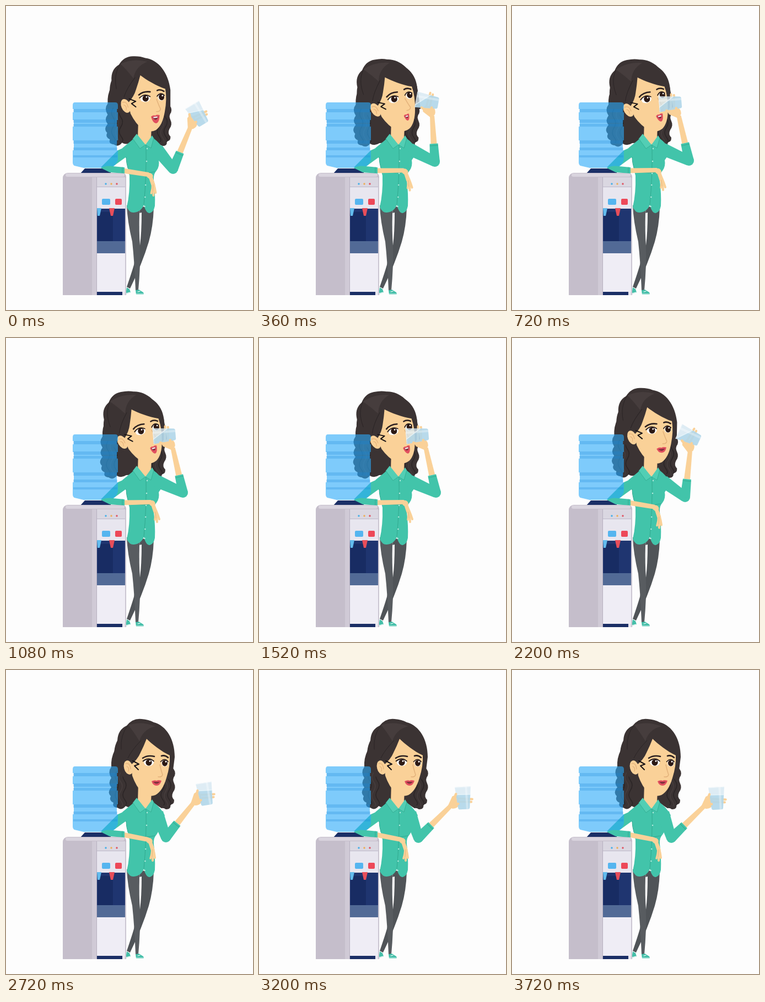
These frames come from a looping animation (448x552 px, 4080 ms). An HTML page with a canvas:

```html
<!DOCTYPE html>
<html lang="en">
<head>
<meta charset="utf-8">
<title>Water cooler break</title>
<style>
html, body { margin: 0; width: 100%; height: 100%; overflow: hidden; background: #fdfdfd; }
canvas { display: block; }
</style>
</head>
<body>
<canvas id="stage" width="448" height="552"></canvas>
<script>
const ctx = document.getElementById('stage').getContext('2d');
const LOOP = 4080, STEP = 40, RAD = Math.PI / 180;
const SKIN = '#fad198', SKIN_DARK = '#e3b27b', HAIR = '#3b3333', HAIR_DARK = '#2b2526',
  HAIR_LIGHT = '#463d3d', TEAL = '#42c4aa', TEAL_DARK = '#32a98f', NAVY = '#1b2f66';

// time, elbow x/y, glass x/y, glass tilt, head tilt, mouth width/height
const KEYS = [
  [0, 303, 296, 348, 197, -31, -7, 16, 14],
  [360, 319, 283, 305, 173, -80, -16.5, 10, 11],
  [520, 321, 281, 287, 176.5, -95, -17, 13, 13],
  [1840, 321, 281, 287, 176.5, -95, -17, 13, 13],
  [2200, 314, 289, 321, 178, -65, -6, 18, 9],
  [2420, 300, 298, 347, 199, -34, -1, 18, 9],
  [2720, 290, 304, 361.5, 225, -9, 0, 18, 9],
  [3360, 289, 305, 371.5, 233, -3, 0, 18, 9]
];

const secant = (i, c) => (KEYS[i + 1][c] - KEYS[i][c]) / (KEYS[i + 1][0] - KEYS[i][0]);

function slope(i, c) {
  if (i === 0) return secant(0, c);
  if (i === KEYS.length - 1) return 0;
  const a = secant(i - 1, c), b = secant(i, c);
  return a * b > 0 ? 2 * a * b / (a + b) : 0;
}

// Monotone cubic interpolation of every column
function poseAt(t) {
  const last = KEYS.length - 1;
  if (t >= KEYS[last][0]) return KEYS[last].slice(1);
  const i = KEYS.findIndex((k, n) => n < last && t < KEYS[n + 1][0]);
  const d = KEYS[i + 1][0] - KEYS[i][0], u = (t - KEYS[i][0]) / d, v = 1 - u;
  return KEYS[i].slice(1).map((a, n) => {
    const c = n + 1, b = KEYS[i + 1][c];
    return v * v * (1 + 2 * u) * a + u * u * (3 - 2 * u) * b
      + d * (u * v * v * slope(i, c) - u * u * v * slope(i + 1, c));
  });
}

function fill(color, path) {
  ctx.fillStyle = color;
  ctx.fill(new Path2D(path));
}

function line(color, width, path) {
  ctx.strokeStyle = color;
  ctx.lineWidth = width;
  ctx.stroke(new Path2D(path));
}

function rect(color, x, y, w, h, r = 0) {
  ctx.fillStyle = color;
  ctx.beginPath();
  ctx.roundRect(x, y, w, h, r);
  ctx.fill();
}

function oval(color, x, y, rx, ry = rx, turn = 0) {
  ctx.fillStyle = color;
  ctx.beginPath();
  ctx.ellipse(x, y, rx, ry, turn, 0, 7);
  ctx.fill();
}

function limb(color, x1, y1, w1, x2, y2, w2) {
  const a = Math.atan2(y2 - y1, x2 - x1), s = Math.sin(a) / 2, c = Math.cos(a) / 2;
  fill(color, `M${x1 - s * w1} ${y1 + c * w1}L${x2 - s * w2} ${y2 + c * w2}
    L${x2 + s * w2} ${y2 - c * w2}L${x1 + s * w1} ${y1 - c * w1}Z`);
}

function group(draw, x = 0, y = 0, turn = 0) {
  ctx.save();
  ctx.translate(x, y);
  ctx.rotate(turn);
  draw();
  ctx.restore();
}

function curls() {
  fill(HAIR, `M250 98Q300 104 303 150Q302 168 300 176Q309 183 306 192Q301 198 305 206
    Q309 214 303 222Q299 230 305 236Q305 245 298 244Q300 253 290 253Q286 250 282 251
    Q277 248 272 244L234 246Q225 252 217 247Q210 256 202 250Q192 249 195 241
    Q186 237 190 229Q183 222 191 213Q184 205 191 196Q184 185 191 176Q190 160 197 146Z`);
  const wave = 'q-6 9 0 17t0 17t0 17t2 10';
  for (const x of [201, 215, 284, 296]) line(HAIR_DARK, 1.5, `M${x} 184${wave}`);
  for (const x of [208, 290]) line(HAIR_LIGHT, 1.5, `M${x} 186${wave}`);
}

function legs() {
  fill('#505458', 'M243 364L268 366Q267 400 259 428Q247 468 225 513L219 510Q228 484 232 470L240 430Z');
  fill('#585c60', 'M219 362L243 364Q241 400 243 432Q244 475 240 516L235 516Q233 465 229 428Q220 390 219 362Z');
  fill('#fdfdfd', 'M242 376L246 375Q246 410 243 435Q241 410 242 376Z');
  fill('#45bfa9', 'M219 511L224 514L226 520L217 523Z');
  fill('#45bfa9', 'M235 516L241 515L249 520Q251 524 248 524L236 524Z');
  line('#ffffff', 1.2, 'M236 523H249M239 519L243 518M217 522L225 520');
}

function torso() {
  fill(SKIN, 'M240 205L264 216L263 240L253 254L239 240Z');
  fill(TEAL, 'M214 257L203 262L172 293L189 295L218 274Z');
  fill(TEAL, `M236 236L228 244L211 258L212 272L218 276Q220 294 224 308Q225 340 219 365
    Q224 376 232 375Q245 374 250 361Q254 377 261 376Q268 374 270 363Q271 342 268 316
    Q267 305 273 299Q279 291 277 280L288 264Q282 251 265 238L253 252Z`);
  line(TEAL_DARK, 1, 'M254 252Q255 310 250 361M223 299Q248 306 270 301M218 275Q218 284 221 294');
  fill('#52ceb4', 'M237 232L253 252L243 259L230 241Z');
  fill('#52ceb4', 'M265 235L253 252L263 258L268 240Z');
  line(TEAL_DARK, .8, 'M230 241L243 259L253 252L263 258L268 240');
  for (const y of [259, 282, 304, 325, 347, 364]) oval('#b9ede0', 256 - (y - 259) / 24, y, 1.2);
}

function eye(x, y, rx, look) {
  oval('#ffffff', x, y, rx, 6.3);
  oval('#2c1914', x + look, y - look * .5, Math.min(rx - 1, 5.6), 5.8);
  oval('#ffffff', x + look + 2, y - 2.5, 1.4);
  line('#211718', 1.7, `M${x - rx - 1.5} ${y - 2.5}Q${x} ${y - 10.5} ${x + rx} ${y - 2.5}`);
}

function mouth(w, h) {
  const x = 273, y = 202;
  fill('#e1505f', `M${x - w / 2} ${y}Q${x - 3} ${y - 3} ${x} ${y - 1}Q${x + 3} ${y - 3} ${x + w / 2} ${y - 1}
    Q${x + w * .35} ${y + h - 1} ${x} ${y + h - 1}Q${x - w * .35} ${y + h - 1} ${x - w / 2} ${y}Z`);
  fill('#82303c', `M${x - w * .34} ${y + 1}H${x + w * .34}Q${x} ${y + h * .9} ${x - w * .34} ${y + 1}Z`);
  if (h > 10) rect('#ffffff', x - w * .25, y + 1, w * .5, 2, 1);
}

function head(k, mw, mh) {
  fill(HAIR, `M198 168Q193 145 202 128Q203 108 219 101Q230 87 246 89Q259 90 268 95
    C291 101 306 126 306 158L301 198L212 194Z`);
  fill(HAIR_LIGHT, 'M222 100Q245 92 271 102Q248 108 242 129Q233 114 222 100Z');
  line(HAIR_DARK, 1, 'M221 101Q207 117 209 144M245 128Q228 145 221 160');
  fill(SKIN, `M255 125C264 134 282 148 297 155Q298 174 291 196Q284 220 271 227
    Q258 232 247 222Q236 212 229 192L227 172Q239 162 244 150Q250 138 255 125Z`);
  oval(SKIN, 222, 177, 8, 13, -.25);
  line(SKIN_DARK, 1.2, 'M217 170Q225 168 226 180M219 175Q224 177 222 184');
  line('#191416', 2, 'M230 165L241 171L233 174L240 181');
  eye(259, 168, 9, k);
  eye(288, 169, 6, k);
  line('#2b2020', 2.6, 'M248 160Q257 154 269 157M282 156Q288 154 294 159');
  line(SKIN_DARK, 1.5, 'M279 172Q282 185 284 190Q283 195 276 194');
  mouth(mw, mh);
}

function bottle() {
  const body = `M125 175H198Q203 175 203 180V187H201V193H203V207H201V219H203V244H201V262H203V279
    Q200 291 188 294H141L124 290Q121 288 121 284V262H123V244H121V219H123V207H121V193H123V187H121V180Q121 175 125 175Z`;
  fill('rgba(43,170,250,.6)', body);
  const bands = [[187, 6], [206, 6], [214, 5], [244, 6], [257, 5], [271, 4]];
  for (const [y, h] of bands) rect('rgba(20,130,215,.25)', 122, y, 80, h);
}

function cooler() {
  fill(NAVY, 'M143 295H184L192 305H134Z');
  rect('#c5becb', 103, 303, 115, 222, [9, 7, 0, 0]);
  rect('#d0cad6', 156, 311, 9, 214);
  rect('#d9d4de', 108, 304, 107, 6, 3);
  rect('#e8e6ef', 165, 311, 51, 214);
  rect('#dad7e1', 165, 311, 51, 17);
  rect('#bdb9c8', 165, 328, 51, 1);
  ['#45aee8', '#efad54', '#df5362'].forEach((c, i) => oval(c, 181 + i * 10, 323, 1.7));
  rect('#55b5ef', 174, 350, 15, 11, 2);
  rect('#ed4858', 198, 350, 12, 11, 2);
  rect('#1f3570', 165, 368, 51, 59);
  rect('#182c63', 166, 374, 28, 53);
  fill('#62bbed', 'M165 367H173L170 381H166Z');
  fill('#e74e5a', 'M187 367H197L194 381H190Z');
  rect('#526a96', 165, 427, 51, 22);
  rect('#efedf5', 165, 449, 51, 70);
  rect(NAVY, 165, 519, 46, 6);
  rect('#b8b1c1', 164, 311, 1, 214);
  rect('#cbc6d2', 216, 312, 2, 213);
}

function restingArm(k) {
  const x = 258 + 5 * k, y = 308 - 10 * k;
  limb(SKIN, 212, 299, 9, x, y, 8);
  oval(SKIN, x + 2, y + 2, 6, 5, .5);
  const tips = [[7, 38, 4], [3, 34, 3.5], [11, 33, 4]];
  for (const [dx, dy, w] of tips) {
    line(SKIN, w, `M${x + 3} ${y + 3}Q${x + 10} ${y + 15} ${x + dx + 1 + k * 3} ${y + dy - k * 2}`);
  }
  line(SKIN, 7, `M${x + 3} ${y + 3}L${x + 8} ${y + 18}`);
  line(SKIN_DARK, .8, `M${x + 8} ${y + 18}L${x + 7 + 2 * k} ${y + 31 - 2 * k}`);
  fill(TEAL, 'M172 294Q181 289 194 291L215 293V304L188 302Z');
  line(TEAL_DARK, 1, 'M211 293V303');
}

function glass(x, y, turn) {
  const shape = new Path2D('M-14.5 -20.5H14.5L10.5 18Q10 20.5 8 20.5H-8Q-10 20.5 -10.5 18Z');
  group(() => {
    ctx.fillStyle = 'rgba(214,232,242,.78)';
    ctx.fill(shape);
    ctx.clip(shape);
    group(() => {
      rect('rgba(160,207,230,.6)', -45, -6, 90, 60);
      rect('rgba(235,248,252,.7)', -45, -7, 90, 1.5);
    }, 0, 0, -turn * .6);
    rect('rgba(255,255,255,.3)', 4, -21, 4, 42);
    line('rgba(255,255,255,.5)', 1.2, 'M-15 -20H15');
  }, x, y, turn);
}

function drinkingArm(ex, ey, gx, gy, tilt) {
  const turn = tilt * RAD, c = Math.cos(turn), s = Math.sin(turn);
  const wx = gx - 24.5 * c - 13.5 * s, wy = gy - 24.5 * s + 13.5 * c;
  const d = Math.hypot(wx - ex, wy - ey), cx = ex + (wx - ex) * 33 / d, cy = ey + (wy - ey) * 33 / d;
  limb(SKIN, cx, cy, 11, wx, wy, 8);
  limb(TEAL, 274, 260, 23, ex, ey, 18);
  oval(TEAL, ex, ey, 9);
  limb(TEAL, ex, ey, 18, cx, cy, 15);
  const ux = (wx - ex) / d, uy = (wy - ey) / d;
  limb(TEAL_DARK, cx - ux * 4, cy - uy * 4, 15, cx - ux * 3, cy - uy * 3, 15);
  group(() => {
    fill(SKIN, 'M-29 13L-20 -4Q-13 -8 -9 -2L-7 12Q-13 19 -21 18Z');
    line(SKIN, 4, 'M-12 0L16 3M-12 6L14 8');
  }, gx, gy, turn);
  glass(gx, gy, turn);
  group(() => line(SKIN, 4.5, 'M-21 7Q-17 2 -13 -8M-17 10L-10 10'), gx, gy, turn);
}

function draw(t) {
  const [ex, ey, gx, gy, tilt, nod, mw, mh] = poseAt(t), k = -nod / 17;
  rect('#fdfdfd', 0, 0, 448, 552);
  ctx.lineCap = ctx.lineJoin = 'round';
  group(curls, -16 * k, 3 * k);
  legs();
  torso();
  group(() => {
    ctx.translate(-252, -232);
    head(k, mw, mh);
  }, 252 + 4 * k, 232 + k, nod * RAD);
  bottle();
  cooler();
  restingArm(k * k);
  drinkingArm(ex, ey, gx, gy, tilt);
}

const start = performance.now();
function frame() {
  const t = (performance.now() - start) % LOOP;
  draw(Math.floor(t / STEP) * STEP);
  requestAnimationFrame(frame);
}
frame();
</script>
</body>
</html>
```
